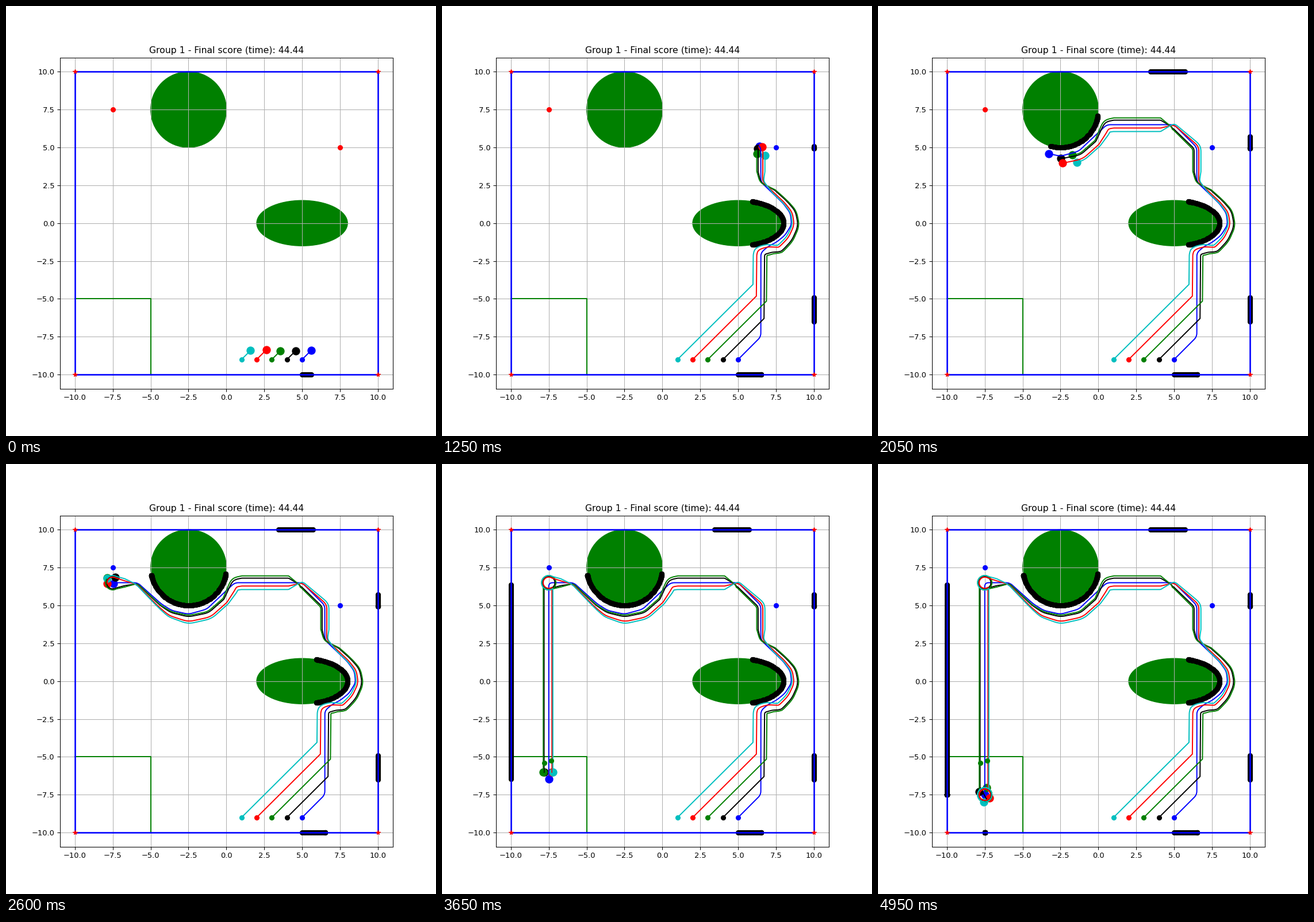
A matplotlib script for the animation above (5000 ms loop, 748x748 px).

```python
import numpy as np
import matplotlib.pyplot as plt
from matplotlib.animation import FuncAnimation
from matplotlib.patches import Circle, Ellipse

FRAMES, INTERVAL = 100, 50
START, STEP = -1.3, .1     # times are in frames; the run starts before 0
SPIN = 24                  # degrees per frame while circling the goal

# Corners of the leader's route
CORNERS = np.array([
    (5, -9), (6.5, -7.5), (6.5, -1.95), (7, -1.52), (7.5, -1.28), (8.1, -.8),
    (8.53, -.1), (8.45, .65), (8, 1.28), (6.5, 2.72), (6.5, 5), (5, 6.5),
    (.55, 6.5), (-1.3, 4.75), (-2.5, 4.42), (-3.6, 4.66), (-4.3, 5.1),
    (-5.86, 6.5), (-7.5, 6.5), (-7.5, -7.51)])
TURN_A, TURN_B = 10, 18    # corners where the leader waits for the group
GATE, HOME = CORNERS[TURN_B], np.array([-7.5, -7.5])

# (corner, gain, push): a follower's distance left of the route there
# is gain * lane + push; it drifts linearly in between
DRIFT = np.array([
    (1, 1, .1), (2, 1, .05), (4, .6, -.5), (6, .5, -.28), (8.5, .3, -.15),
    (9.3, -.6, 0), (10, -.6, 0), (11, -.4, .1), (11.2, 1, 0), (11.9, 1, 0),
    (12.5, .55, .47), (14, .6, .35), (16, .25, .2), (17, .1, .1),
    (17.6, -.7, 0)])


def lerp(t, keys, points):
    return np.column_stack([np.interp(t, keys, c) for c in points.T])


def arc_length(pts):
    return np.r_[0, np.cumsum(np.hypot(*np.diff(pts, axis=0).T))]


def rounded(pts, radius=.25):
    """Polyline with its corners replaced by small quadratic curves."""
    out = [pts[:1]]
    u = np.linspace(0, 1, 9)[:, None]
    for a, p, b in zip(pts, pts[1:], pts[2:]):
        ends = []
        for q in (a, b):
            d = np.hypot(*(q - p))
            ends.append(p + (q - p) * min(radius, d / 2) / d)
        out.append((1 - u) ** 2 * ends[0] + 2 * u * (1 - u) * p
                   + u ** 2 * ends[1])
    return np.vstack(out + [pts[-1:]])


curve = rounded(CORNERS)
length = arc_length(curve)
S = np.arange(0, length[-1], .02)
ROUTE = lerp(S, length, curve)
CORNER_S = np.array([S[np.argmin(np.hypot(*(ROUTE - c).T))] for c in CORNERS])

# Left-hand normals, averaged so that offset lanes take corners softly
tangent = np.gradient(ROUTE, axis=0)
normal = np.column_stack([
    np.convolve(n, np.ones(25), "same") for n in (-tangent[:, 1], tangent[:, 0])])
normal /= np.hypot(*normal.T)[:, None]

# Leader: steady speed between two stops, then a slow settling at the goal
stop_a, stop_b, goal = CORNER_S[[TURN_A, TURN_B, -1]]
KEY_T = [START, 23.3, 24.8, 48, 54, 74.5, FRAMES]
KEY_S = [0, stop_a, stop_a, stop_b, stop_b, goal - .02, goal]


def progress(t):
    return np.interp(t, KEY_T, KEY_S)


def in_lane(s, lane):
    corner = np.interp(s, CORNER_S, np.arange(len(CORNERS)))
    gain, push = (np.interp(corner, DRIFT[:, 0], c) for c in DRIFT.T[1:])
    return lerp(s, S, ROUTE) + (gain * lane + push)[:, None] * lerp(s, S, normal)


def circle(center, radius, degrees):
    a = np.radians(degrees)
    return center + radius * np.column_stack([np.cos(a), np.sin(a)])


class Path:
    def __init__(self, times, pts):
        self.times, self.pts = times, pts

    def at(self, t):
        return lerp([t], self.times, self.pts)

    def trail(self, t):
        return np.vstack([self.pts[self.times <= t], self.at(t)])


def lead():
    t = np.arange(START, FRAMES, STEP)
    return Path(t, lerp(progress(t), S, ROUTE))


def follow(x0, lane, delay, angle):
    # Diagonal run from the start to the lane
    x = CORNERS[1][0] - lane - .1
    y = x - x0 - 9
    s_join = CORNER_S[1] + y - CORNERS[1][1]
    t_join = np.interp(s_join, KEY_S[:2], KEY_T[:2]) + delay
    # The leader's route, a little later
    t_lane = np.arange(t_join, KEY_T[3] + delay - 1, STEP)
    # Circling while the leader waits, then straight down
    radius = .27 + .45 * abs(lane)
    t_loop = np.linspace(KEY_T[3] + delay, KEY_T[4] + .4 * delay, 60)
    turn = (60, 305) if lane > 0 else (-60, -500)
    loop = circle(GATE, radius, np.linspace(*turn, 60))
    # Circling the goal
    t_home = np.arange(75, FRAMES, STEP)
    home = circle(HOME, radius, angle + SPIN * (t_home - 82))
    return Path(np.r_[START, t_lane, t_loop, 74.5, t_home],
                np.vstack([(x0, -9), in_lane(progress(t_lane - delay), lane),
                           loop, (loop[-1, 0], -7), home]))


leader = lead()
team = [(leader, "b"),
        (follow(4, -.3, 1.2, 102), "k"),
        (follow(3, -.45, 2.3, 27), "g"),
        (follow(2, .22, 1.3, 276), "r"),
        (follow(1, .45, 2.5, 215), "c")]

around = np.linspace(0, 360, 1500)
RIMS = np.vstack([circle((-2.5, 7.5), 2.5, around),
                  circle((5, 0), np.array([3, 1.5]), around)])


def nearest(p):
    """Closest point to p on the walls or on an obstacle."""
    x, y = p
    spots = np.vstack([[(-10, y), (10, y), (x, -10), (x, 10)], RIMS])
    return spots[np.argmin(np.hypot(*(spots - p).T))]


scan = np.array([nearest(p) for p in leader.pts])

fig, ax = plt.subplots(figsize=(8, 8), dpi=93.5)
ax.set(xlim=(-11, 11), ylim=(-10.93, 10.93),
       title="Group 1 - Final score (time): 44.44")
ticks = np.arange(-10, 10.1, 2.5)
ax.set_xticks(ticks)
ax.set_yticks(ticks)
ax.grid(True)

ax.add_patch(Circle((-2.5, 7.5), 2.5, color="green"))
ax.add_patch(Ellipse((5, 0), 6, 3, color="green"))
ax.plot([-10, -5, -5], [-5, -5, -10], color="green")
hits, = ax.plot([], [], "ko")
ax.plot([-10, 10, 10, -10, -10], [-10, -10, 10, 10, -10], color="b", lw=2)
ax.plot([-10, 10, 10, -10], [-10, -10, 10, 10], "r*")

# (marker, time at which the leader has visited it)
targets = [(ax.plot(7.5, 5, "ro")[0], KEY_T[1]),
           (ax.plot(-7.5, 7.5, "ro")[0], KEY_T[3])]

agents = []
for path, color in team:
    head, = ax.plot([], [], "o", color=color, ms=10, zorder=2.1)
    ax.plot(*path.pts[0], "o", color=color)
    line, = ax.plot([], [], color=color, zorder=2.2)
    agents.append((path, line, head))

entries, = ax.plot([-7.78, -7.35], [-5.4, -5.25], "go", zorder=2.3)


def update(i):
    for path, line, head in agents:
        line.set_data(*path.trail(i).T)
        head.set_data(*path.at(i).T)
    hits.set_data(*scan[leader.times <= i + 1e-6].T)
    for mark, when in targets:
        mark.set_color("b" if i >= when else "r")
    entries.set_visible(i >= 72)


anim = FuncAnimation(fig, update, frames=FRAMES, interval=INTERVAL,
                     repeat=True, repeat_delay=0, blit=False)
plt.show()
```
